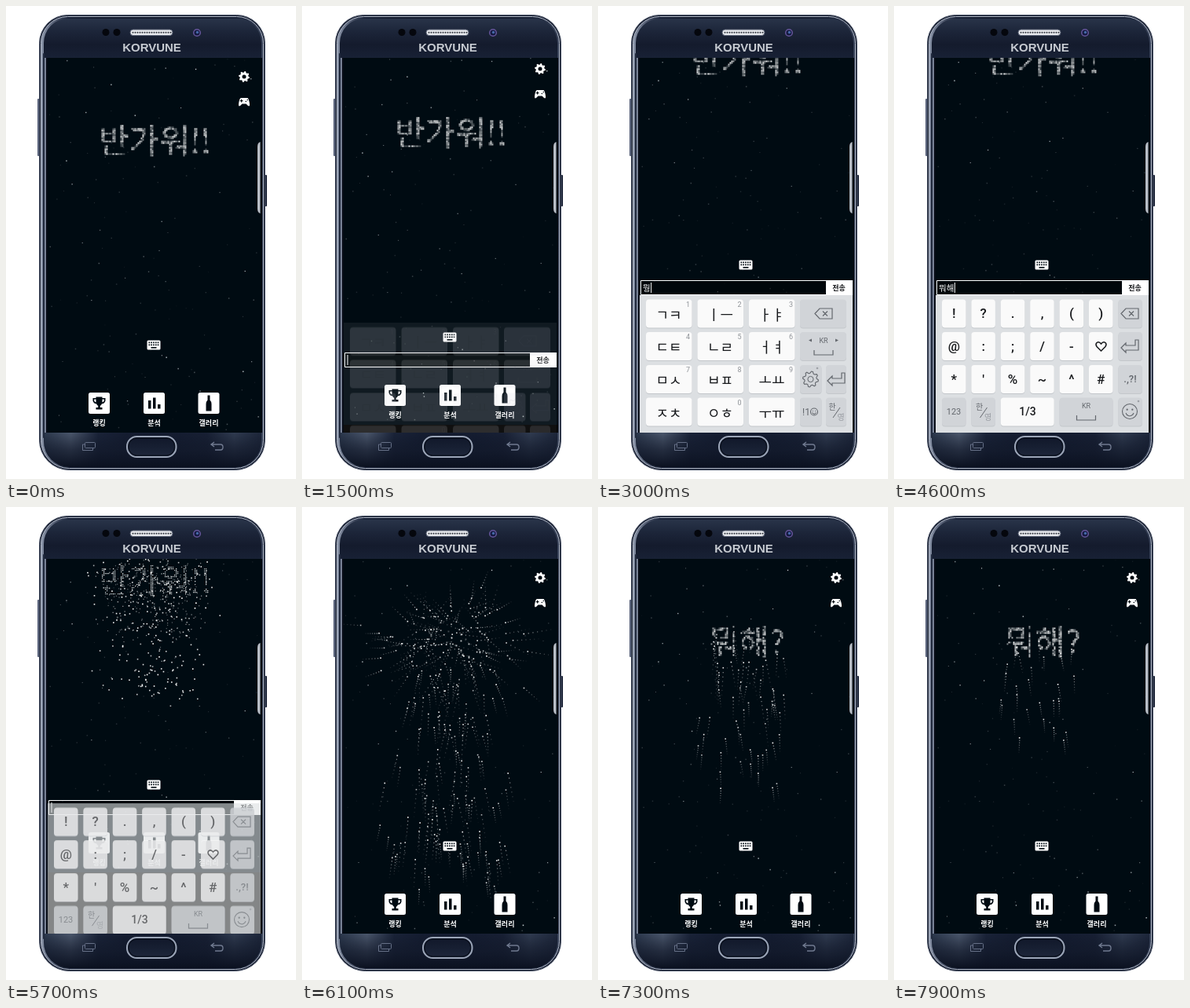
These frames come from a looping animation (369 by 602 pixels, 8 s). An HTML page with a canvas:

```html
<!DOCTYPE html>
<html lang="ko">
<head>
<meta charset="utf-8">
<style>
  html, body { margin: 0; width: 100%; height: 100%; overflow: hidden; background: #fff; }
  canvas { display: block; width: 369px; height: 602px; }
</style>
</head>
<body>
<canvas id="stage" width="369" height="602"></canvas>
<script>
const W = 369, H = 602, LOOP = 8000, TAU = Math.PI * 2;
const KOREAN = '"Noto Sans CJK KR", "Noto Sans CJK JP", sans-serif';
const LATIN = 'Roboto, "Noto Sans CJK KR", sans-serif';
const NIGHT = '#000b12', INK = '#17191c', GREY = '#63676d';
const stage = document.getElementById('stage').getContext('2d');
let ctx = stage;

function seeded(seed) {
  return () => {
    seed = (seed * 1664525 + 1013904223) >>> 0;
    return seed / 4294967296;
  };
}

// Piecewise linear track through [time, value] points.
function track(t, points) {
  let [t0, v0] = points[0];
  for (const [t1, v1] of points) {
    if (t < t1) return t1 === t0 ? v1 : v0 + (v1 - v0) * Math.max(0, t - t0) / (t1 - t0);
    [t0, v0] = [t1, v1];
  }
  return v0;
}

function box(x, y, w, h, r, fill, stroke, lineWidth = 1) {
  ctx.beginPath();
  ctx.roundRect(x, y, w, h, r);
  if (fill) { ctx.fillStyle = fill; ctx.fill(); }
  if (stroke) { ctx.strokeStyle = stroke; ctx.lineWidth = lineWidth; ctx.stroke(); }
}

function disc(x, y, r, fill, stroke, lineWidth = 1) {
  box(x - r, y - r, r * 2, r * 2, r, fill, stroke, lineWidth);
}

function label(s, x, y, size, color, weight = 500, family = KOREAN, align = 'center') {
  ctx.font = `${weight} ${size}px ${family}`;
  ctx.textAlign = align;
  ctx.textBaseline = 'middle';
  ctx.fillStyle = color;
  ctx.fillText(s, x, y);
}

function shape(x, y, d, fill, stroke, lineWidth = 1) {
  const path = new Path2D(d);
  ctx.save();
  ctx.translate(x, y);
  if (fill) { ctx.fillStyle = fill; ctx.fill(path); }
  if (stroke) { ctx.strokeStyle = stroke; ctx.lineWidth = lineWidth; ctx.stroke(path); }
  ctx.restore();
}

function gradient(x0, y0, x1, y1, ...colors) {
  const g = ctx.createLinearGradient(x0, y0, x1, y1);
  colors.forEach((c, i) => g.addColorStop(i / (colors.length - 1), c));
  return g;
}

/* ---------- phone ---------- */

function drawPhone() {
  ctx.fillStyle = '#fff';
  ctx.fillRect(0, 0, W, H);
  box(40, 118, 3, 73, 1, '#59627a');
  box(328, 215, 4, 40, 1, '#1b2336');
  box(42.5, 11.5, 287, 579, [36, 36, 38, 38], '#111829', '#4d566a');
  box(44.5, 13.5, 283, 575, [34, 34, 36, 36], gradient(44, 0, 328, 0,
    '#8c96aa', '#192238', '#131a2c', '#131a2c', '#131a2c', '#131a2c', '#131a2c', '#182136', '#3b455b'), '#b4bccb');
  box(48, 16, 277, 50, [31, 31, 0, 0], gradient(0, 16, 0, 66, '#293449', '#1c2539', '#141b2d', '#182135'));
  box(48, 543, 277, 44, [0, 0, 33, 33], gradient(48, 0, 325, 0,
    '#2b374c', '#4a566b', '#1a2338', '#151d31', '#151d31', '#151d31', '#182034', '#303b50', '#1d263a'));
  box(48, 543, 277, 44, [0, 0, 33, 33], gradient(0, 543, 0, 587, '#0d142400', '#111829aa', '#0b1120'));
  box(47, 60, 2, 490, 1, '#20293d');
  box(51, 66, 2, 477, 0, '#080d18');

  disc(127, 33.5, 4.5, '#05070d');
  disc(141, 33.5, 4.5, '#05070d');
  box(158, 30, 54, 7.5, 3.7, '#e6e8ec', '#5a6275');
  for (let x = 161.5; x < 210; x += 3) disc(x, 33.8, 1, '#30343d');
  disc(243, 34, 4.3, '#151a40', '#65559a', 1.5);
  disc(243.5, 33.5, 1.7, '#4569a8');
  label('KORVUNE', 185.5, 54, 15, '#c6cad1', 700, '"Liberation Sans", sans-serif');

  box(154, 548, 62.5, 26, 12.5, gradient(0, 548, 0, 574, '#101729', '#1e273b'), '#9ca6b8', 2);
  box(156, 550, 58.5, 22, 10.5, null, '#070c17');
  box(100.5, 555.5, 13, 7, 1, null, '#667087');
  shape(0, 0, 'M100 558H97.5V565.5H110.5V563', null, '#667087');
  shape(268, 560, 'M-3 -5L-7 -2L-3 1M-7 -2H5Q8 -2 8 1.5T5 5H-2', null, '#707a90', 1.4);
}

/* ---------- home page ---------- */

function gear(x, y, r, fill, hole, outline) {
  ctx.beginPath();
  for (let i = 0; i < 32; i++) {
    const a = (i + .5) / 32 * TAU, d = i % 4 < 2 ? r : r * .77;
    ctx.lineTo(x + d * Math.cos(a), y + d * Math.sin(a));
  }
  ctx.closePath();
  if (fill) { ctx.fillStyle = fill; ctx.fill(); }
  if (outline) { ctx.strokeStyle = outline; ctx.lineWidth = 1.1; ctx.stroke(); }
  disc(x, y, r * .36, hole, outline);
}

function tile(x, name, icon) {
  box(x - 13.5, 492, 27, 27, 2.5, '#fff');
  shape(x, 505.5, icon, NIGHT);
  label(name, x, 531, 9, '#fff', 700);
}

function drawHomeIcons() {
  gear(303, 90, 7, '#fff', NIGHT);
  shape(303, 122, 'M-4 -5H4Q6 -5 7 3Q7.4 6.5 5 5L2.5 2.5H-2.5L-5 5Q-7.4 6.5 -7 3Q-6 -5 -4 -5Z', '#fff');
  shape(303, 122, 'M-4 -3.2H-2.8V-2H-1.6V-.8H-2.8V.4H-4V-.8H-5.2V-2H-4Z', NIGHT);
  disc(2.3 + 303, 121.5, .8, NIGHT);
  disc(4.3 + 303, 119.5, .8, NIGHT);

  box(179.5, 425.5, 17, 12, 1.5, '#fff');
  ctx.fillStyle = NIGHT;
  for (let i = 0; i < 10; i++) ctx.fillRect(181.5 + i % 5 * 2.8, 427.5 + (i / 5 | 0) * 3, 1.7, 1.7);
  ctx.fillRect(184.5, 434, 7, 1.6);

  tile(118.5, '랭킹', 'M-4 -8H4V-6.5H8V-3Q7 .5 3.5 .8Q2.5 2.8 1.3 3.3V5.5H4V8H-4V5.5H-1.3V3.3Q-2.5 2.8 -3.5 .8Q-7 .5 -8 -3V-6.5H-4Z' +
    'M-4 -5H-6.3V-3Q-5.7 -1.3 -4 -1ZM4 -5V-1Q5.7 -1.3 6.3 -3V-5Z');
  tile(188.5, '분석', 'M-7.5 -3.5H-4V7H-7.5ZM-1.5 -7H2V7H-1.5ZM4.5 1.5H8V7H4.5Z');
  tile(258, '갤러리', 'M-1.5 -10H1.5V-4Q3.5 -2 3.5 1V10H-3.5V1Q-3.5 -2 -1.5 -4Z');
}

const rand = seeded(77);
const stars = Array.from({ length: 150 }, () => ({
  x: 55 + rand() * 266, y: 67 + rand() * 474,
  size: .8 + rand() * .8, glow: .15 + rand() ** 2 * .75,
  rate: .002 + rand() * .004, phase: rand() * TAU
}));

function drawStars(t) {
  ctx.fillStyle = '#e4edf0';
  for (const s of stars) {
    ctx.globalAlpha = s.glow * (.65 + .35 * Math.sin(t * s.rate + s.phase));
    ctx.fillRect(s.x, s.y, s.size, s.size);
  }
  ctx.globalAlpha = 1;
}

/* ---------- particle words ---------- */

function wordPoints(word) {
  const c = document.createElement('canvas');
  c.width = W; c.height = 260;
  ctx = c.getContext('2d');
  label(word, 189.5, 171, 42, '#fff');
  const data = ctx.getImageData(0, 0, W, 260).data, points = [];
  ctx = stage;
  for (let y = 140; y < 204; y += 2)
    for (let x = 100; x < 280; x += 2)
      if (data[(y * W + x) * 4 + 3] > 110) points.push({ x, y, glow: .22 + rand() * .78 });
  return points;
}

const BURST = 5650, RETURN = 5850;
const greeting = wordPoints('반가워!!');
const question = wordPoints('뭐해?').map((p, i, all) => {
  const from = greeting[Math.floor(i / all.length * greeting.length)] || p;
  let dx, dy, speed;
  if (rand() < .4) {
    const a = rand() * TAU, d = 25 + rand() * 85;
    [dx, dy, speed] = [d * 1.15 * Math.cos(a), d * .85 * Math.sin(a), 100 + rand() * 130];
  } else {
    dy = 40 + rand() * 305;
    [dx, speed] = [(rand() - .5) * (50 + dy * .25), 95 + rand() * 125];
  }
  return { ...p, from, dx, dy, speed, far: Math.hypot(dx, dy) };
});

// Flung out of the first word, then drawn in at constant speed.
function place(p, t) {
  if (t < RETURN) {
    const u = Math.max(0, (t - BURST) / (RETURN - BURST)), e = 1 - (1 - u) ** 2;
    return [p.from.x + (p.x + p.dx - p.from.x) * e, p.from.y + (p.y + p.dy - p.from.y) * e, true];
  }
  const left = Math.max(0, 1 - p.speed * (t - RETURN) / 1000 / p.far);
  return [p.x + p.dx * left, p.y + p.dy * left, left > 0];
}

function drawWord(t) {
  ctx.fillStyle = '#fff';
  if (t < BURST) {
    for (const p of greeting) {
      ctx.globalAlpha = p.glow;
      ctx.fillRect(p.x - .5, p.y - .5, 1.9, 1.9);
    }
  } else {
    for (const p of question) {
      const [x, y, flying] = place(p, t);
      const size = flying ? 1.6 : 1.9;
      ctx.globalAlpha = flying ? .55 + p.glow * .45 : p.glow;
      ctx.fillRect(x - .5, y - .5, size, size);
      if (!flying) continue;
      for (let k = 1; k < 7; k++) {
        const [tx, ty] = place(p, t - k * 28);
        ctx.globalAlpha = (.25 + p.glow * .5) * (1 - k / 7);
        ctx.fillRect(tx, ty, 1.2, 1.2);
      }
    }
  }
  ctx.globalAlpha = 1;
}

/* ---------- input and keyboard ---------- */

const typing = [[0, ''], [2100, 'ㅁ'], [2400, '무'], [2600, '뭐'], [2900, '뭥'], [3200, '뭫'],
  [3400, '뭐하'], [3700, '뭐해'], [5000, '뭐해?'], [5600, '']];

function drawInput(t) {
  const typed = typing.filter(([at]) => at <= t).pop()[1];
  box(54.5, 451.5, 269, 18, 0, '#00000066', '#fff');
  box(290, 451, 34, 19, 0, '#fff');
  label('전송', 306.5, 461, 9, INK, 700);
  label(typed, 57, 461, 10.5, '#fff', 400, KOREAN, 'left');
  ctx.fillRect(57.5 + ctx.measureText(typed).width, 454, 1, 13);
}

const ROWS = [373.5, 415, 457, 498.5];

function key(x, row, w, color, pressed) {
  box(x, ROWS[row] + 1, w, 36, 4, '#c3c7cb');
  box(x, ROWS[row], w, 36, 4, pressed ? '#b9dce6' : color);
}
const plainKey = (x, row, w, pressed) => key(x, row, w, '#fafafa', pressed);
const greyKey = (x, row, w) => key(x, row, w, '#d1d4d8');

const backspace = x => shape(x, 391.5, 'M-11 0L-5 -6.5H11V6.5H-5ZM-1 -3L5 3M5 -3L-1 3', null, GREY, 1.2);
const enter = (x, y) => shape(x, y, 'M-11 2L-5 -4V-1H7V-8H11V5H-5V8Z', null, GREY, 1.2);

function languageKey(x) {
  label('한', x - 5, 510, 10, GREY);
  label('영', x + 6, 523, 10, '#989ca2');
  shape(x, 517, 'M-4 7L5 -6', null, GREY);
}

function spaceMark(x, y, half) {
  label('KR', x, y - 8, 9, GREY, 400, LATIN);
  shape(x, y + 7, `M${-half} -3V3H${half}V-3`, null, GREY, 1.2);
}

function smile(x, y, r) {
  disc(x, y, r, null, GREY, 1.1);
  disc(x - r * .35, y - r * .25, r * .12, GREY);
  disc(x + r * .35, y - r * .25, r * .12, GREY);
  ctx.beginPath();
  ctx.arc(x, y + r * .05, r * .55, .3, Math.PI - .3);
  ctx.stroke();
}

function drawLetterKeys(t) {
  'ㄱㅋ ㅣㅡ ㅏㅑ ㄷㅌ ㄴㄹ ㅓㅕ ㅁㅅ ㅂㅍ ㅗㅛ ㅈㅊ ㅇㅎ ㅜㅠ'.split(' ').forEach((pair, i) => {
    const x = 61 + i % 3 * 65.5, row = i / 3 | 0;
    const pressed = (i === 2 && t === 3400) || (i === 1 && t === 3700);
    plainKey(x, row, 58.5, pressed);
    label(pair, x + 29, ROWS[row] + 19.5, 18, INK);
    const digit = i < 9 ? i + 1 : i === 10 ? '0' : '';
    label(digit, x + 53.5, ROWS[row] + 6.5, 9, '#8f9398', 400, LATIN);
  });
  greyKey(257, 0, 59);
  backspace(287);
  greyKey(257, 1, 59);
  spaceMark(287, 434, 12);
  shape(270, 425.5, 'M2 -2V2L-2 0Z', GREY);
  shape(304, 425.5, 'M-2 -2V2L2 0Z', GREY);
  greyKey(257, 2, 27.5);
  gear(270.5, 475, 10, null, null, GREY);
  disc(279, 461, 1.3, '#9da1a6');
  greyKey(290, 2, 26);
  enter(303, 475);
  greyKey(257, 3, 27.5);
  label('!1', 265, 517, 12, GREY, 400, LATIN);
  smile(275, 516.5, 4.5);
  greyKey(290, 3, 26);
  languageKey(303);
}

function drawSymbolKeys(t) {
  [..."!?.,()@:;/-♡*'%~^#"].forEach((symbol, i) => {
    const x = 61 + i % 6 * 37.4, row = i / 6 | 0;
    plainKey(x, row, 30.5, i === 1 && t === 5000);
    if (symbol === '♡')
      shape(x + 15.5, 433, 'M0 6L-5.5 .5Q-7.5 -2.5 -5.5 -4.5Q-2.5 -6.5 0 -3Q2.5 -6.5 5.5 -4.5Q7.5 -2.5 5.5 .5Z', null, INK, 1.5);
    else label(symbol, x + 15.3, ROWS[row] + 18.5, 17, INK, 500, LATIN);
  });
  for (let row = 0; row < 4; row++) greyKey(285.4, row, 30.5);
  backspace(300);
  enter(300, 433);
  label('.,?!', 300.5, 475, 13, GREY, 500, LATIN);
  smile(300, 516, 9.5);
  disc(311, 503, 1.3, '#9da1a6');
  greyKey(61, 3, 30.5);
  label('123', 76, 517, 11, GREY, 400, LATIN);
  greyKey(98.4, 3, 30.5);
  languageKey(113.5);
  plainKey(135.8, 3, 67.9);
  label('1/3', 170, 517, 14, INK, 500, LATIN);
  greyKey(210.6, 3, 67.9);
  spaceMark(244.5, 517, 12);
}

function drawKeyboard(t, lift) {
  const alpha = track(t, [[1400, 0], [1500, .07], [1600, .5], [1700, 1], [5600, 1], [5700, .6], [5800, .1], [5900, 0]]);
  if (!alpha) return;
  ctx.save();
  ctx.globalAlpha = alpha;
  ctx.translate(0, (102 - lift) * .38);
  ctx.fillStyle = '#dcdfe2';
  ctx.fillRect(53, 368, 271, 175);
  if (t < 4300) drawLetterKeys(t); else drawSymbolKeys(t);
  ctx.restore();
}

function drawScreen(t) {
  const lift = track(t, [[1400, 0], [1500, 10], [1600, 52], [1700, 88], [1800, 102],
    [5600, 102], [5700, 78], [5800, 28], [5900, 0]]);
  ctx.save();
  ctx.beginPath();
  ctx.rect(53, 66, 273, 477);
  ctx.clip();
  ctx.fillStyle = '#000';
  ctx.fillRect(53, 66, 273, 477);
  ctx.save();
  ctx.translate(0, -lift);
  ctx.fillStyle = NIGHT;
  ctx.fillRect(53, 66, 273, 477);
  drawStars(t);
  drawWord(t);
  drawHomeIcons();
  if (t >= 1400 && t < 5900) drawInput(t);
  ctx.restore();
  drawKeyboard(t, lift);
  ctx.restore();
  shape(0, 0, 'M323.5 173Q320 174 320 179V258Q320 263 323.5 264Z', '#b9bec6');
}

function frame(now) {
  const t = Math.floor(now % LOOP / 100) * 100;
  drawPhone();
  drawScreen(t);
  requestAnimationFrame(frame);
}
requestAnimationFrame(frame);
</script>
</body>
</html>
```
